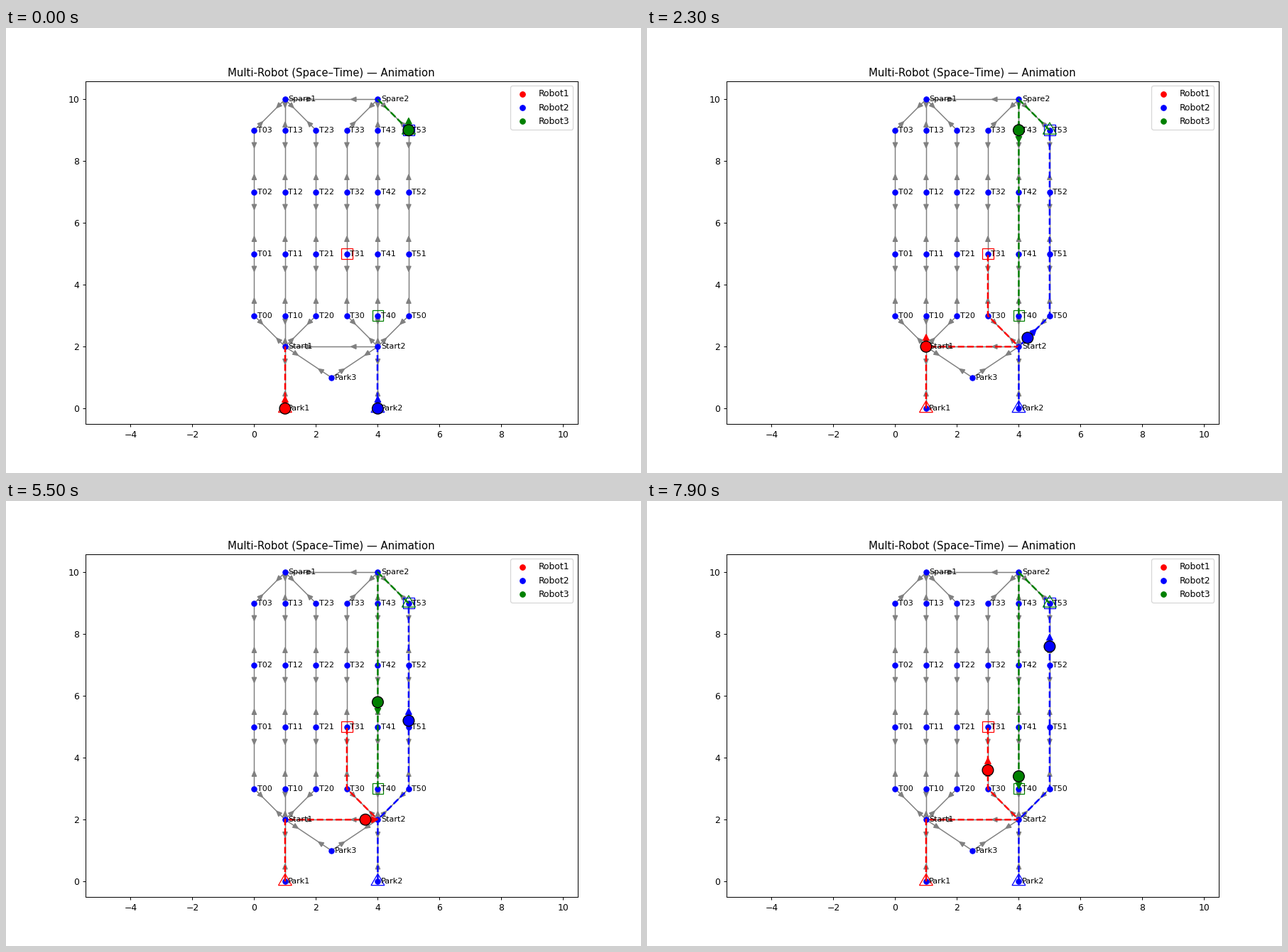
These frames come from a looping animation (894x626 px, 8 s). A matplotlib script:

```python
import numpy as np
import matplotlib.pyplot as plt
from matplotlib.animation import FuncAnimation
from matplotlib.patches import Circle, Polygon, Rectangle, RegularPolygon

plt.rcParams["font.family"] = "DejaVu Sans"

W, H, DPI = 894, 626, 89.4
FRAMES, INTERVAL = 80, 100
STEPS_PER_UNIT = 10
WAIT_STEPS = 10
REVEAL_EVERY = 5

# Warehouse graph
nodes = {"Park1": (1, 0), "Park2": (4, 0), "Park3": (2.5, 1),
         "Start1": (1, 2), "Start2": (4, 2),
         "Spare1": (1, 10), "Spare2": (4, 10)}
edges = [("Park1", "Start1"), ("Park2", "Start2"), ("Park3", "Start1"),
         ("Park3", "Start2"), ("Start1", "Start2"), ("Spare1", "Spare2")]
for col in range(6):
    side = 1 + col // 3
    for row in range(4):
        nodes[f"T{col}{row}"] = (col, 3 + 2 * row)
    edges += [(f"T{col}{r}", f"T{col}{r + 1}") for r in range(3)]
    edges += [(f"Start{side}", f"T{col}0"), (f"T{col}3", f"Spare{side}")]

routes = [
    ("Robot1", "red", "Park1 Start1 Start1 Start2 T30 T31"),
    ("Robot2", "blue", "Park2 Start2 T50 T51 T52 T53"),
    ("Robot3", "green", "T53 Spare2 T43 T42 T41 T40"),
]


def head(tip, u, length, width):
    """Corners of a triangle pointing along the unit vector u."""
    base = tip - u * length
    side = np.array([-u[1], u[0]]) * width / 2
    return np.array([tip, base + side, base - side])


fig = plt.figure(figsize=(W / DPI, H / DPI), dpi=DPI)
ax = fig.add_subplot()
ax.set_title("Multi-Robot (Space–Time) — Animation")
ax.set_xlim(-5.465, 10.465)
ax.set_ylim(-0.50375, 10.57875)
ax.set_autoscale_on(False)

for edge in edges:
    a, b = (np.array(nodes[n], float) for n in edge)
    ax.plot(*zip(a, b), color="gray", lw=1.2, zorder=1)
    for p, q in ((a, b), (b, a)):
        dist = np.hypot(*(q - p))
        u = (q - p) / dist
        ax.add_patch(Polygon(head(p + u * (0.3 * dist - 0.03), u, 0.17, 0.15),
                             color="gray", lw=1, zorder=1.1))

for name, (x, y) in nodes.items():
    ax.scatter(x, y, s=34, color="blue", zorder=1.5)
    ax.text(x + 0.1, y, name, fontsize=9, va="center")


class Robot:
    def __init__(self, name, color, route):
        self.pts = np.array([nodes[n] for n in route.split()], float)
        self.moves = np.diff(self.pts, axis=0)
        dist = np.hypot(*self.moves.T)
        steps = np.where(dist > 0, (dist * STEPS_PER_UNIT).astype(int), WAIT_STEPS)
        self.times = np.concatenate([[0], np.cumsum(steps)])

        ax.scatter([], [], color=color, label=name)
        outline = dict(fill=False, edgecolor=color, lw=1, zorder=2.5)
        ax.add_patch(RegularPolygon(self.pts[0], 3, radius=0.25, **outline))
        ax.add_patch(Rectangle(self.pts[-1] - 0.175, 0.35, 0.35, **outline))
        self.trail, = ax.plot([], [], "--", color=color, lw=2, zorder=2)
        self.arrow = ax.add_patch(Polygon(np.zeros((3, 2)), color=color, lw=1, zorder=5))
        self.body = ax.add_patch(Circle(self.pts[0], 0.18, facecolor=color,
                                        edgecolor="black", lw=1.1, zorder=6))

    def heading(self, k):
        if k == 0:
            return np.array([0.0, 1.0])
        i = min(np.searchsorted(self.times, k) - 1, len(self.moves) - 1)
        while not self.moves[i].any():  # keep facing the same way while waiting
            i -= 1
        return self.moves[i] / np.hypot(*self.moves[i])

    def draw(self, k, shown):
        pos = np.array([np.interp(k, self.times, c) for c in self.pts.T])
        u = self.heading(k)
        self.body.center = pos
        self.arrow.set_xy(head(pos + 0.4 * u, u, 0.2, 0.2))
        self.trail.set_data(*self.pts[:shown + 1].T)


robots = [Robot(*r) for r in routes]
ax.legend(loc="upper right")


def update(i):
    k = i + 1 if i else 0
    shown = 1 + i // REVEAL_EVERY
    for robot in robots:
        robot.draw(k, shown)
    return []


anim = FuncAnimation(fig, update, frames=FRAMES, interval=INTERVAL,
                     repeat=True, repeat_delay=0)
plt.show()
```
